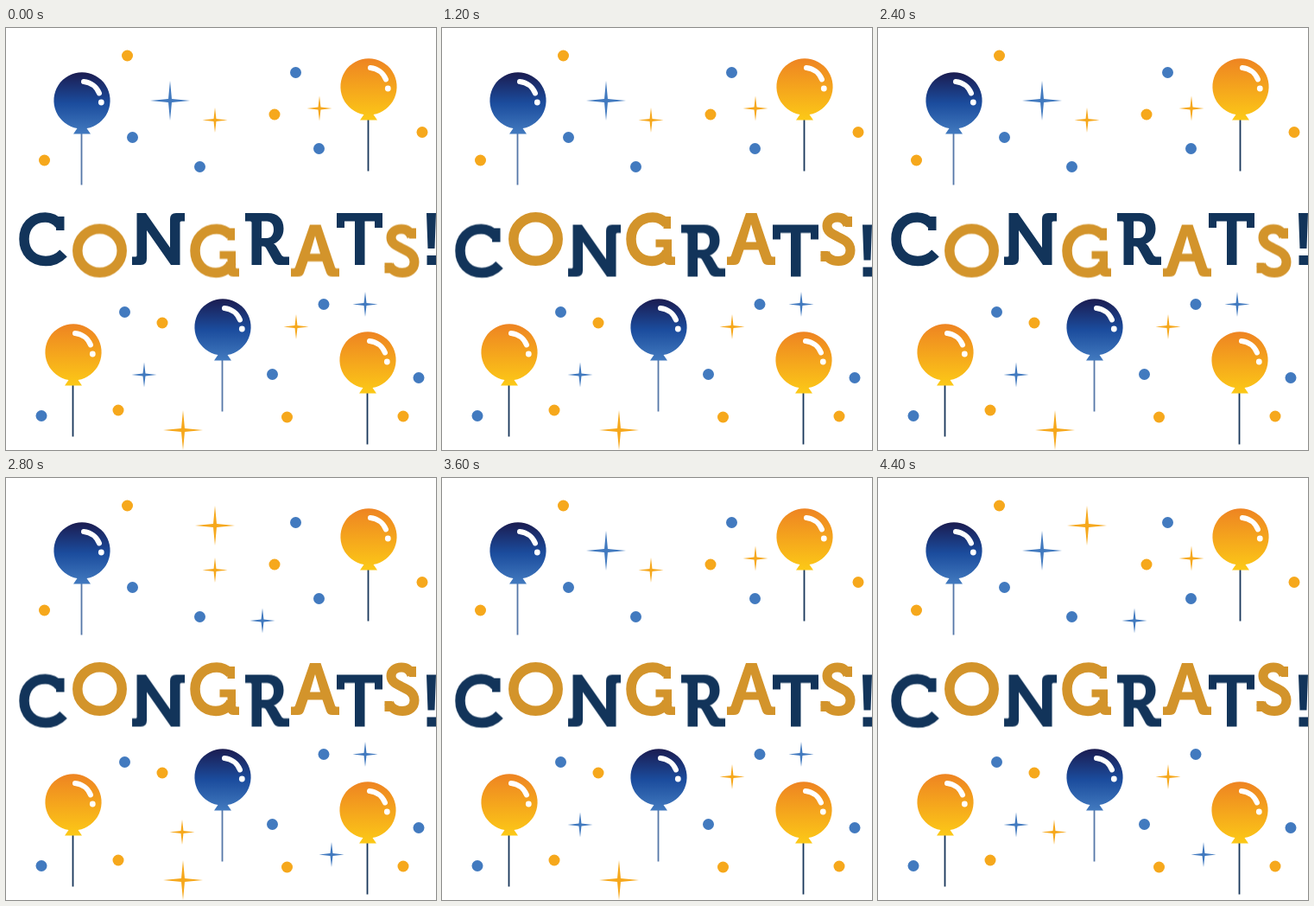
An HTML page for the animation above (4.8 s loop, 498 px wide and 488 px high).

```html
<!DOCTYPE html>
<html lang="en">
<head>
<meta charset="utf-8">
<title>Congrats!</title>
<style>
  html, body { margin: 0; width: 100%; height: 100%; overflow: hidden; background: #fff; }
  svg { display: block; width: 498px; height: 488px; }

  .navy { --ink: #12345a; animation: drop .8s step-end infinite; }
  .gold { --ink: #d3942b; animation: drop .8s -.4s step-end infinite; }
  .fill { fill: var(--ink); }
  .line { fill: none; stroke: var(--ink); stroke-width: 11.5; }

  .orange { fill: #f6a81c; }
  .blue { fill: #427abf; }

  .twinkle { animation: blink 1.2s step-end infinite; }
  .second { animation-delay: -.8s; }
  .third { animation-delay: -.4s; }

  @keyframes drop { 50% { transform: translateY(13.5px); } }
  @keyframes blink { 0% { opacity: 0; } 33.333%, 100% { opacity: 1; } }
</style>
</head>
<body>
<svg viewBox="0 0 498 488" role="img" aria-label="CONGRATS!">
  <defs>
    <linearGradient id="sky" x1="0" y1="0" x2="0" y2="1">
      <stop offset="0" stop-color="#1b1c50"/>
      <stop offset=".5" stop-color="#1b4c9d"/>
      <stop offset="1" stop-color="#427abf"/>
    </linearGradient>
    <linearGradient id="sun" x1="0" y1="0" x2="0" y2="1">
      <stop offset="0" stop-color="#ee8422"/>
      <stop offset="1" stop-color="#fcc917"/>
    </linearGradient>
    <path id="skin" d="M-5.500 32A32.600 32.600 0 1 1 5.500 32L10 38.500H-10Z"/>
    <path id="string" d="M-.5 38V97.500" stroke-width="1.800"/>
    <g id="shine">
      <path d="M2-22A22 22 0 0 1 20-8.500" fill="none" stroke="#fff" stroke-width="6" stroke-linecap="round"/>
      <circle cx="22.300" cy="2" r="3.400" fill="#fff"/>
    </g>
    <g id="blueBalloon">
      <use href="#string" stroke="#5577a8"/>
      <use href="#skin" fill="url(#sky)"/>
      <use href="#shine"/>
    </g>
    <g id="orangeBalloon">
      <use href="#string" stroke="#17365a"/>
      <use href="#skin" fill="url(#sun)"/>
      <use href="#shine"/>
    </g>
    <circle id="dot" r="6.500"/>
    <path id="big" d="M0-23L2-2L23 0L2 2L0 23L-2 2L-23 0L-2-2Z"/>
    <path id="small" d="M0-14.500L1.500-1.500L14.500 0L1.500 1.500L0 14.500L-1.500 1.500L-14.500 0L-1.500-1.500Z"/>
  </defs>

  <use href="#blueBalloon" x="88" y="84"/>
  <use href="#orangeBalloon" x="420" y="68"/>
  <use href="#orangeBalloon" x="78" y="375"/>
  <use href="#blueBalloon" x="251" y="346"/>
  <use href="#orangeBalloon" x="419" y="384"/>

  <g class="orange">
    <use href="#dot" x="140.500" y="32"/>
    <use href="#dot" x="44.500" y="153"/>
    <use href="#dot" x="311" y="100"/>
    <use href="#dot" x="482" y="120.500"/>
    <use href="#dot" x="181" y="341"/>
    <use href="#dot" x="130" y="442"/>
    <use href="#dot" x="325.500" y="450"/>
    <use href="#dot" x="460" y="449"/>
  </g>
  <g class="blue">
    <use href="#dot" x="146.500" y="126.500"/>
    <use href="#dot" x="224.500" y="160.500"/>
    <use href="#dot" x="335.500" y="51.500"/>
    <use href="#dot" x="362.500" y="139.500"/>
    <use href="#dot" x="137.500" y="328.500"/>
    <use href="#dot" x="368" y="319.500"/>
    <use href="#dot" x="308.500" y="400.500"/>
    <use href="#dot" x="478" y="404.500"/>
    <use href="#dot" x="41" y="448.500"/>
  </g>

  <g class="twinkle">
    <use href="#big" class="orange" x="242" y="55"/>
    <use href="#small" class="blue" x="297" y="165"/>
    <use href="#small" class="orange" x="204" y="409.500"/>
    <use href="#small" class="blue" x="377" y="435.500"/>
  </g>
  <g class="twinkle second">
    <use href="#big" class="blue" x="190" y="84"/>
    <use href="#small" class="orange" x="363" y="93"/>
    <use href="#small" class="orange" x="336" y="345.500"/>
    <use href="#small" class="blue" x="160" y="401"/>
  </g>
  <g class="twinkle third">
    <use href="#small" class="orange" x="242" y="106.500"/>
    <use href="#small" class="blue" x="416" y="319.500"/>
    <use href="#big" class="orange" x="205" y="465"/>
  </g>

  <!-- C N R T ! -->
  <g class="navy">
    <path class="line" d="M62 227C57 221 51 219 45.500 219C30 219 21 230 21 244C21 259 31 269.500 46 269.500C54 269.500 61 266.500 66.500 260.500"/>
    <path class="fill" d="M58 218H67.500V234H58Z"/>
    <path class="fill" d="M151.500 214H162L190 254V221Q190 214 197 214H207V223.500H203Q201.500 223.500 201.500 225V274H191L163 234V267Q163 274 156 274H146V264.500H150Q151.500 264.500 151.500 263Z"/>
    <path class="fill" fill-rule="evenodd" d="M277 214H303C315 214 321.500 221 321.500 232C321.500 241 316.500 247 310 249.500C312 250.500 313 252 314 254L319 262.500C320 264 321 264.500 323 264.500H328V274H318C312.500 274 311 272.500 309 268.500L301.500 255C300.500 253 299.500 252.500 297 252.500H296V274H284.500V225Q284.500 223.500 283 223.500H277ZM296 223.500V243H302C307 243 310 239 310 233C310 227 307 223.500 302 223.500Z"/>
    <path class="fill" d="M383 214H436V231H427V223.500H415.500V274H404V223.500H392V231H383Z"/>
    <path class="fill" d="M487 214H498L496.500 255H488.500ZM487.500 263H498V274H487.500Z"/>
  </g>

  <!-- O G A S -->
  <g class="gold">
    <ellipse class="line" cx="108.500" cy="244" rx="25.700" ry="25.300"/>
    <path class="line" d="M260 226C255 221 250 219 244 219C229 219 219 230 219 244C219 259 229 269.500 243 269.500C251 269.500 259 265 261 258"/>
    <path class="fill" d="M256.500 218H265V232H256.500ZM247.500 244.500H266V263Q266 264.500 267.500 264.500H270V274H263Q256.500 274 256.500 267V253.500H247.500Z"/>
    <path class="fill" fill-rule="evenodd" d="M352 214H364.500L381 263Q381.500 264.500 383 264.500H386V274H378Q372.500 274 371 269.500L366.500 256.500H349.500L345 269.500Q343.500 274 338 274H330V264.500H333Q334.500 264.500 335 263ZM358 227L352 247.500H364Z"/>
    <path class="line" style="stroke-width:11" d="M470 228C468 222 464 219 458 219C451 219 446 223 446 229C446 243 473 240 473 257C473 265 467 269.500 459 269.500C452 269.500 446 266 443.500 260"/>
    <path class="fill" d="M467 218H475V230H467ZM438.500 258H447V270H438.500Z"/>
  </g>
</svg>
</body>
</html>
```
